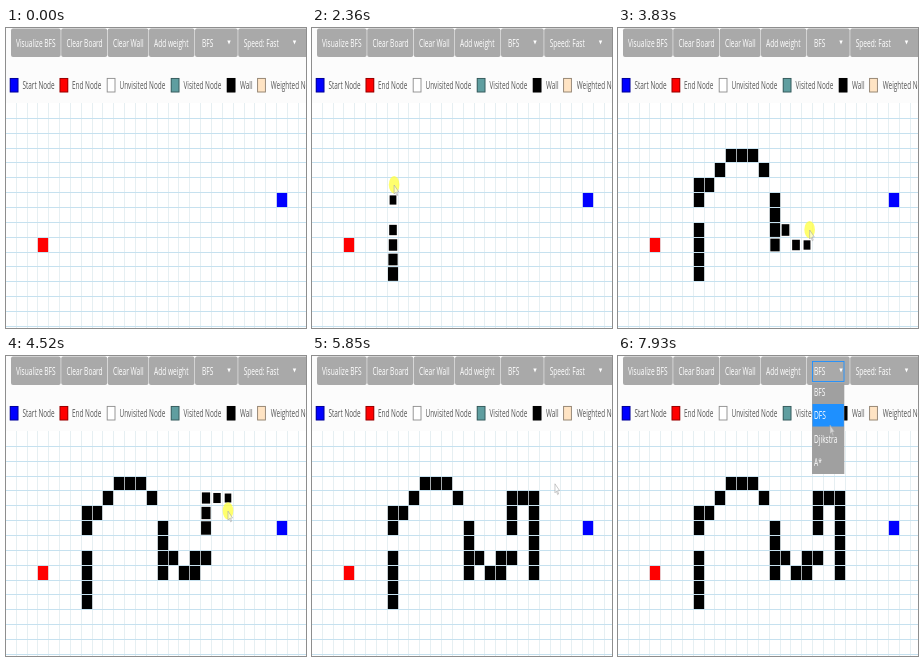
Recreate the animation shown at these times as an HTML page with a canvas. Size 300x300 px, loop 8 s.

```html
<!DOCTYPE html>
<html lang="en">
<head>
<meta charset="utf-8">
<title>Path visualizer</title>
<style>
html, body { margin: 0; width: 100%; height: 100%; overflow: hidden; background: #fff; }
canvas { display: block; width: 300px; height: 300px; }
</style>
</head>
<body>
<canvas id="stage" width="300" height="300"></canvas>
<script>
const ctx = document.getElementById('stage').getContext('2d');
const LOOP = 8000, SQUEEZE = 0.6;      // the whole screen is squeezed sideways
const GREY = '#a9a9a9', BLUE = '#1e90ff';
const DRAG_START = 1830, STEP = 104, GROW = 520, OPEN = 7010;

// Grid lines sit on whole pixels.
const lineX = c => Math.round(c * 10.85 - 1.2);
const lineY = r => Math.round(r * 14.85 + 75);
const centerX = c => (lineX(c) + 1 + lineX(c + 1)) / 2;
const centerY = r => (lineY(r) + 1 + lineY(r + 1)) / 2;

// The wall is drawn at a steady pace; each word is the step to the next cell.
const count = (word, letter) => word.split(letter).length - 1;
const walls = [{ col: 7, row: 11, time: DRAG_START }];
for (const word of 'u u u uu u r ur ur r r dr ddr d d d ur dr r u r uu u u r r d d d d d'.split(' ')) {
  const { col, row, time } = walls[walls.length - 1];
  walls.push({
    col: col + count(word, 'r'),
    row: row + count(word, 'd') - count(word, 'u'),
    time: time + STEP
  });
}

// Pointer moves: start time, end time, x, y
const moves = [
  [190, 480, 180, 266], [480, 820, 88, 259], [1280, 1360, 84, 259],
  ...walls.map(({ col, row, time }) => [time - STEP, time, centerX(col), centerY(row)]),
  [4950, 5150, 222, 220], [5200, 5450, 244, 163], [5780, 5850, 243, 128],
  [5850, 6460, 216, 21], [6610, 6780, 212, 16], [7780, 7930, 212, 69]
];

const ramp = (t, from, to) => Math.min(1, Math.max(0, (t - from) / (to - from)));
const smooth = p => p * p * (3 - 2 * p);

function pointer(t) {
  let x = 244, y = 215;
  for (const [from, to, toX, toY] of moves) {
    const p = ramp(t, from, to);
    x += (toX - x) * p;
    y += (toY - y) * p;
  }
  return [x, y];
}

function rect(x, y, w, h, color) {
  ctx.fillStyle = color;
  ctx.fillRect(x, y, w, h);
}

function text(str, x, y, color, size = 11) {
  ctx.save();
  ctx.translate(x, y);
  ctx.scale(SQUEEZE, 1);
  ctx.font = size + 'px "Open Sans", "Noto Sans", sans-serif';
  ctx.fillStyle = color;
  ctx.fillText(str, 0, 0);
  ctx.restore();
}

function button(x, w, label, textX, arrowX) {
  ctx.fillStyle = GREY;
  ctx.beginPath();
  ctx.roundRect(x, 0.6, w, 28.4, 2);
  ctx.fill();
  text(label, textX, 19.2, '#fff');
  if (!arrowX) return;
  ctx.fillStyle = '#fff';
  ctx.beginPath();
  ctx.moveTo(arrowX - 1.7, 12.5);
  ctx.lineTo(arrowX + 1.7, 12.5);
  ctx.lineTo(arrowX, 16.5);
  ctx.fill();
}

function legend(x, color, label, textX) {
  rect(x, 50, 8.6, 14.4, color);
  ctx.strokeStyle = 'rgba(0,0,0,.45)';
  ctx.lineWidth = 0.9;
  ctx.strokeRect(x + 0.4, 50.4, 7.8, 13.6);
  text(label, textX, 61, '#555', 10.7);
}

function cell(col, row, color, scale = 1) {
  const w = (lineX(col + 1) - lineX(col) - 0.7) * scale;
  const h = (lineY(row + 1) - lineY(row) - 1) * scale;
  rect(centerX(col) - w / 2, centerY(row) - h / 2, w, h, color);
}

function grid() {
  for (let c = 1; c < 28; c++) rect(lineX(c), 75, 1, 225, '#e6eff2');
  for (let r = 1; r < 16; r++) rect(0, lineY(r), 300, 1, '#c6e1ef');
}

function toolbar(t) {
  button(5, 49.7, 'Visualize BFS', 10);
  button(55.2, 46, 'Clear Board', 60.5);
  button(101.7, 40.8, 'Clear Wall', 107);
  button(143, 45.5, 'Add weight', 148);
  button(232.2, 80, 'Speed: Fast', 237.7, 288.5);
  const hover = 1 + 0.1 * (smooth(ramp(t, 6560, 6780)) - smooth(ramp(t, OPEN, 7620)));
  ctx.save();
  ctx.translate(210, 15);
  ctx.scale(hover, hover);
  ctx.translate(-210, -15);
  button(189, 42.7, 'BFS', 196, 223);
  if (t >= OPEN) {
    ctx.strokeStyle = BLUE;
    ctx.lineWidth = 0.9;
    ctx.strokeRect(194.5, 5.5, 31.5, 20);
  }
  ctx.restore();
}

function menu(y) {
  const active = y > 47 ? 1 : 0;
  rect(194, 27, 32.3, 91, '#a0a0a0');
  ['BFS', 'DFS', 'Djikstra', 'A*'].forEach((name, i) => {
    const top = 24.5 + i * 23.5;
    if (i === active) rect(194.5, Math.max(top, 27.5), 31.3, i ? 22.5 : 20, BLUE);
    text(name, 196, top + 15, '#fff');
  });
}

function cursor(x, y, pressed) {
  if (pressed) {
    ctx.fillStyle = 'rgba(255,255,60,.75)';
    ctx.beginPath();
    ctx.ellipse(x, y - 0.3, 5.3, 8.7, 0, 0, Math.PI * 2);
    ctx.fill();
  }
  ctx.beginPath();
  [[0, 0], [0, 9], [1.5, 7.4], [2.7, 10.8], [3.6, 10.2], [2.6, 7], [4.6, 6.8]]
    .forEach(([dx, dy]) => ctx.lineTo(x + dx, y + dy));
  ctx.closePath();
  ctx.fillStyle = 'rgba(255,255,255,.55)';
  ctx.fill();
  ctx.strokeStyle = '#a5a5a5';
  ctx.lineWidth = 0.6;
  ctx.stroke();
}

function draw(t) {
  rect(0, 0, 300, 300, '#fff');
  rect(0, 0, 300, 75, '#fcfcfc');
  grid();
  cell(25, 6, '#00f');
  cell(3, 9, '#f00');
  for (const { col, row, time } of walls) {
    const age = t - time - 40;
    if (age >= 0) cell(col, row, '#000', 0.6 + 0.4 * ramp(age, 0, GROW));
  }
  legend(3.8, '#00f', 'Start Node', 16.5);
  legend(53.6, '#f00', 'End Node', 66);
  legend(100.8, '#fff', 'Unvisited Node', 113.5);
  legend(164.8, '#5f9ea0', 'Visited Node', 177.5);
  legend(220.8, '#000', 'Wall', 234);
  legend(251.2, '#ffe4c4', 'Weighted Node', 264.8);
  toolbar(t);
  if (t < 190) return;
  const [x, y] = pointer(t);
  if (t >= OPEN) menu(y);
  cursor(x, y, (t >= 1590 && t < 5200) || (t >= OPEN && t < 7200));
}

function tick() {
  draw(performance.now() % LOOP);
  requestAnimationFrame(tick);
}
tick();
</script>
</body>
</html>
```
